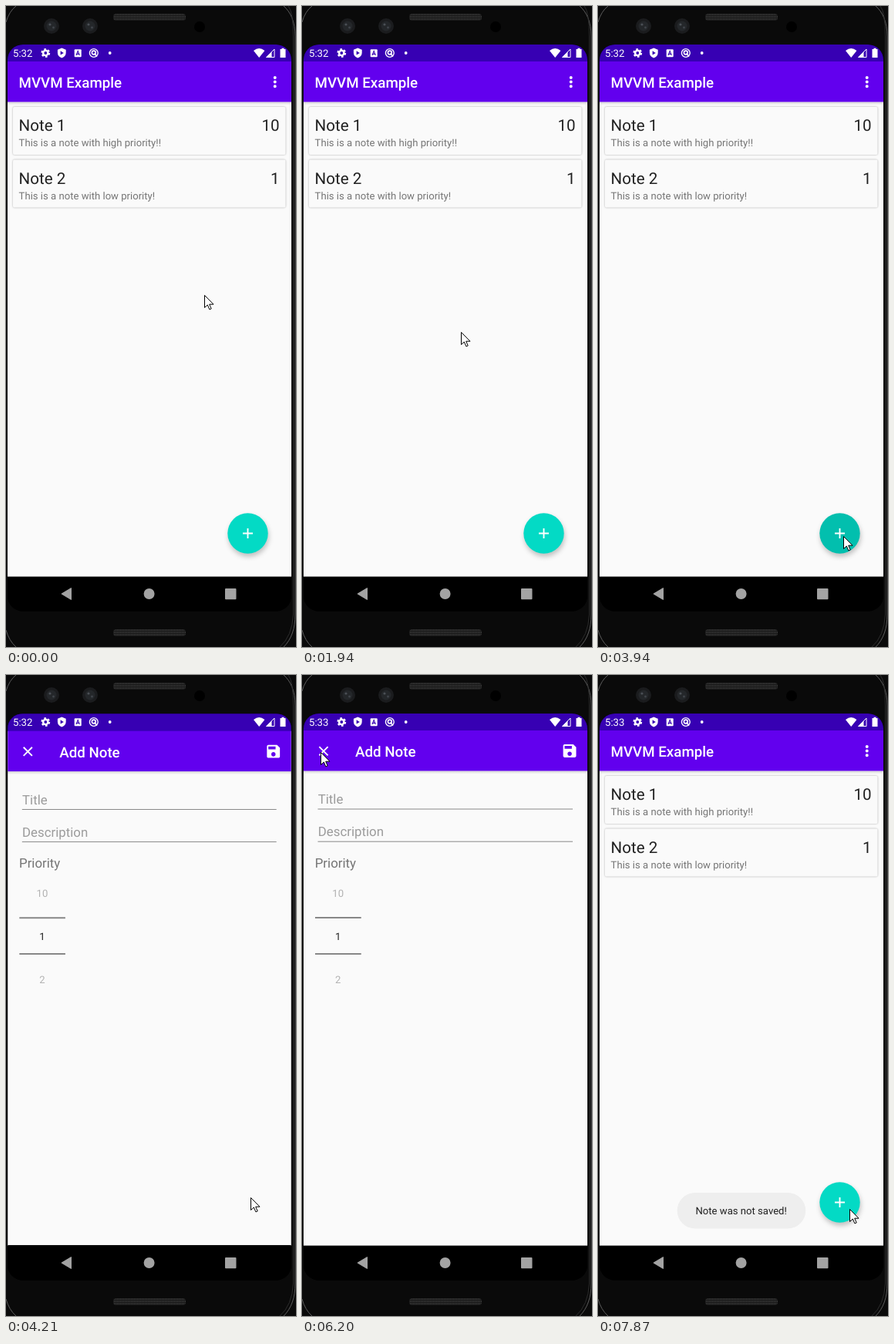
Animation of 376 by 832 pixels, one loop 8000 ms. Source, as an HTML page:

```html
<!DOCTYPE html>
<html lang="en">
<head>
<meta charset="utf-8">
<title>Notes app</title>
<style>
  html, body { margin: 0; width: 100%; height: 100%; overflow: hidden; background: #000; }
  svg { display: block; width: 376px; height: 832px; }
  text { font-family: Roboto, "Noto Sans", sans-serif; fill: #212121; text-rendering: geometricPrecision; }
  .bar { font-size: 18.74px; font-weight: 500; fill: #fff; }
  .head { font-size: 20.6px; }
  .small { font-size: 13.12px; }
  .hint { font-size: 16.87px; fill: #9c9c9c; }
  .grey { fill: #757575; }
  .faint { fill: #b2b2b2; }
  .end { text-anchor: end; }
  .mid { text-anchor: middle; }
  .app { transform-origin: 186px 418px; }
  .card { fill: #fafafa; filter: drop-shadow(0 .6px .9px rgba(0,0,0,.32)); }
  .fab { filter: drop-shadow(1px 4px 3px rgba(0,0,0,.23)); }
</style>
</head>
<body>
<svg viewBox="0 0 376 832">
  <defs>
    <clipPath id="screen"><rect x="2" y="50" width="368" height="735.5" rx="20"/></clipPath>
    <pattern id="mesh" width="2" height="3" patternUnits="userSpaceOnUse">
      <rect width="2" height="3" fill="#1b1b1b"/><rect width="1" height="2" fill="#383838"/>
    </pattern>
    <linearGradient id="shade" x2="0" y2="1">
      <stop stop-color="#000" stop-opacity=".15"/><stop offset="1" stop-color="#000" stop-opacity="0"/>
    </linearGradient>
    <g id="chrome">
      <rect x="2" y="50" width="368" height="736"/>
      <rect x="2" y="72" width="368" height="668.6" fill="#fafafa"/>
      <rect x="2" y="124.5" width="368" height="4" fill="url(#shade)"/>
      <rect x="2" y="50" width="368" height="22.5" fill="#3700b3"/>
      <rect x="2" y="72" width="368" height="52.5" fill="#6200ee"/>
    </g>
    <g id="lens">
      <circle r="10" fill="#1b1c1e"/><circle r="6.5" fill="#24272a"/>
      <circle cx="-2" cy="-2" r="1.6" fill="#4a4f55"/><circle cx="2.5" cy="2" r="1.4" fill="#40444a"/>
    </g>
    <rect id="speaker" x="139" width="94" height="9" rx="4" fill="url(#mesh)"/>
  </defs>

  <!-- phone body -->
  <rect width="376" height="832" fill="#0a0a0a"/>
  <g fill="none" stroke="#5c5c5c">
    <path d="M0 21Q4 7 13 0M360 0C369 8 375 20 375 40V790C375 808 370 822 360 832M0 810Q4 824 13 832"/>
    <path stroke="#2c2c2c" d="M366 0Q372.500 8 372.500 40V790Q371 818 355 832"/>
  </g>
  <use href="#speaker" y="10"/><use href="#speaker" y="809"/>
  <use href="#lens" x="59" y="26"/><use href="#lens" x="109" y="26"/>
  <circle cx="251" cy="27" r="7"/>

  <g clip-path="url(#screen)">
    <rect x="2" y="50" width="368" height="736"/>
    <g id="list" class="app">
      <use href="#chrome"/>
      <text class="bar" x="16.5" y="106">MVVM Example</text>
      <path d="M348.700 93v11.300" stroke="#fff" stroke-width="4" stroke-linecap="round" stroke-dasharray="0 5.600"/>
      <g id="cards"></g>
      <circle id="fab" class="fab" cx="313.5" cy="684.5" r="26.2"/>
      <path d="M307 684.5h13M313.5 678v13" stroke="#fff" stroke-width="1.9"/>
    </g>
    <g id="note" class="app">
      <use href="#chrome"/>
      <path d="M22.4 93.1l11.2 11.2M33.6 93.1l-11.2 11.2" stroke="#fff" stroke-width="1.9"/>
      <text class="bar" x="69" y="106">Add Note</text>
      <path transform="translate(335.8 87.3) scale(.937)" fill="#fff" d="M17 3H5c-1.11 0-2 .9-2 2v14c0 1.1.89 2 2 2h14c1.1 0 2-.9 2-2V7l-4-4zm-5 16c-1.66 0-3-1.34-3-3s1.34-3 3-3 3 1.34 3 3-1.34 3-3 3zm3-10H5V5h10v4z"/>
      <text class="hint" x="20.7" y="167">Title</text>
      <text class="hint" x="20.7" y="209.2">Description</text>
      <path d="M20.5 174h330.5M20.5 216.2h330.5" stroke="#888"/>
      <text class="hint grey" x="16.7" y="249.7">Priority</text>
      <text class="small mid faint" x="46.7" y="288">10</text>
      <text class="small mid" x="46.7" y="344">1</text>
      <text class="small mid faint" x="46.7" y="400">2</text>
      <path d="M17 315h59.7M17 362h59.7" stroke="#878787" stroke-width="2"/>
    </g>

    <!-- status bar -->
    <text id="clock" x="9" y="66" font-size="13.2" style="fill:#fff"></text>
    <g fill="#fff">
      <circle cx="51.3" cy="61" r="4.4"/>
      <circle cx="51.3" cy="61" r="4.9" fill="none" stroke="#fff" stroke-width="2" stroke-dasharray="2.57 2.56"/>
      <path d="M72.3 54.6l5.4 2.2v3.7q0 5-5.4 7-5.4-2-5.4-7v-3.7z"/>
      <rect x="88.7" y="56.2" width="9" height="10" rx="1"/>
      <circle cx="113.8" cy="61" r="5.4" fill="none" stroke="#fff" stroke-width="1.4"/>
      <circle cx="113.8" cy="60.5" r="2.4" fill="none" stroke="#fff" stroke-width="1.6"/>
      <path d="M114.5 61.5l3.500 4" stroke="#fff" stroke-width="1.6"/>
      <circle cx="134.7" cy="61" r="1.9"/>
      <path d="M328.2 67L321 58q7.2-5.8 14.4 0z"/>
      <path d="M348 56v10.5h-10.5z" fill="none" stroke="#fff"/>
      <path d="M344.5 59.5v7h-7z"/>
      <path d="M355.5 56h2v-1.3h3V56h2v11h-7z"/>
    </g>
    <path d="M70.6 58.2l4.2 2.7-4.2 2.7z" fill="#3700b3"/>
    <circle cx="51.3" cy="61" r="1.9" fill="#3700b3"/>
    <path d="M91 64l2.2-5.6L95.4 64M91.8 62.4h2.8" fill="none" stroke="#3700b3" stroke-width="1.1"/>

    <!-- navigation -->
    <g fill="#a3a3a3">
      <path d="M72 763l12.5-7.5v15z" stroke="#a3a3a3" stroke-linejoin="round"/>
      <circle cx="185.6" cy="763" r="7"/>
      <rect x="284" y="756" width="14.5" height="14.3" rx="1"/>
    </g>
    <g id="toast">
      <rect x="102.7" y="672" width="166.5" height="46.5" rx="23.2" fill="#eee"/>
      <text class="small mid" x="185.7" y="700.2">Note was not saved!</text>
    </g>
  </g>
  <path id="cursor" d="M.5 .5V16.5L4.3 13 6.9 18.9 9.2 17.9 6.7 12.2H12z" fill="#fff" stroke="#000"/>
</svg>

<script>
const LOOP = 8000;
const $ = id => document.getElementById(id);

const notes = [
  ["Note 1", 10, "This is a note with high priority!!"],
  ["Note 2", 1, "This is a note with low priority!"]
];
$("cards").innerHTML = notes.map(([title, rank, body], i) => `
  <g transform="translate(0 ${i * 68.5})">
    <rect class="card" x="9" y="131" width="353.5" height="62" rx="2"/>
    <text class="head" x="16.6" y="162">${title}</text>
    <text class="head end" x="354.6" y="162">${rank}</text>
    <text class="small grey" x="16.6" y="182">${body}</text>
  </g>`).join("");

// The screen refreshes in short bursts; the pointer visits a few places in each.
const steps = [];
let last = [257, 375];

function burst(from, to, count, ...stops) {
  const route = [last, ...stops];
  for (let i = 0; i < count; i++) {
    const at = Math.floor((from + (to - from) * i / Math.max(1, count - 1)) / 10) * 10;
    const u = (i + 1) / count * stops.length;
    const k = Math.min(Math.floor(u), stops.length - 1);
    const [a, b] = [route[k], route[k + 1]];
    steps.push({ at, pos: a.map((v, j) => Math.round(v + (b[j] - v) * (u - k))) });
  }
  last = stops.at(-1);
}

burst(0, 0, 1, last);
burst(150, 990, 7, [198, 263], [150, 415]);
burst(1640, 1910, 3, [206, 423]);
burst(2050, 2610, 5, [270, 538], [250, 185], [212, 243]);
burst(2730, 3570, 7, [325, 640], [318, 688]);
burst(3940, 4210, 3, [318, 688], [317, 678]);
burst(4350, 4900, 5, [299, 504]);
burst(5020, 5170, 2, [278, 436]);
burst(5320, 5930, 5, [24, 100]);
burst(6080, 6470, 4, last);
burst(6610, 7010, 4, [150, 624]);
burst(7160, 7580, 4, [326, 693]);

const PRESS = 3940, OPEN = 4070, SHOWN = 4210, CLOCK = 6080, CLOSE = 6340;
const settle = (dt, tau) => Math.exp(-dt / tau);

function zoom(id, scale) {
  const s = scale.toFixed(3);
  $(id).style.transform = s === "1.000" ? "none" : `scale(${s})`;
}

function draw(time) {
  const { at: t, pos } = steps.findLast(s => s.at <= time);
  const opening = t >= OPEN && t < SHOWN;
  const noteUp = t >= OPEN && t < CLOSE;

  $("cursor").setAttribute("transform", `translate(${pos})`);
  zoom("list", opening ? 1.05 : t >= CLOSE ? 1 + .018 * settle(t - CLOSE, 73) : 1);
  zoom("note", noteUp ? 1 - .1 * settle(t - OPEN, 36) : 1);
  $("note").style.opacity = opening ? .5 : +noteUp;
  $("toast").style.opacity = Math.min(1, Math.max(0, (t - CLOSE) / 217));
  $("clock").textContent = t < CLOCK ? "5:32" : "5:33";
  $("fab").setAttribute("fill", t >= PRESS && t < SHOWN ? "#02bfae" : "#03dac5");
}

const start = performance.now();
function tick() {
  draw((performance.now() - start) % LOOP);
  requestAnimationFrame(tick);
}
tick();
</script>
</body>
</html>
```
